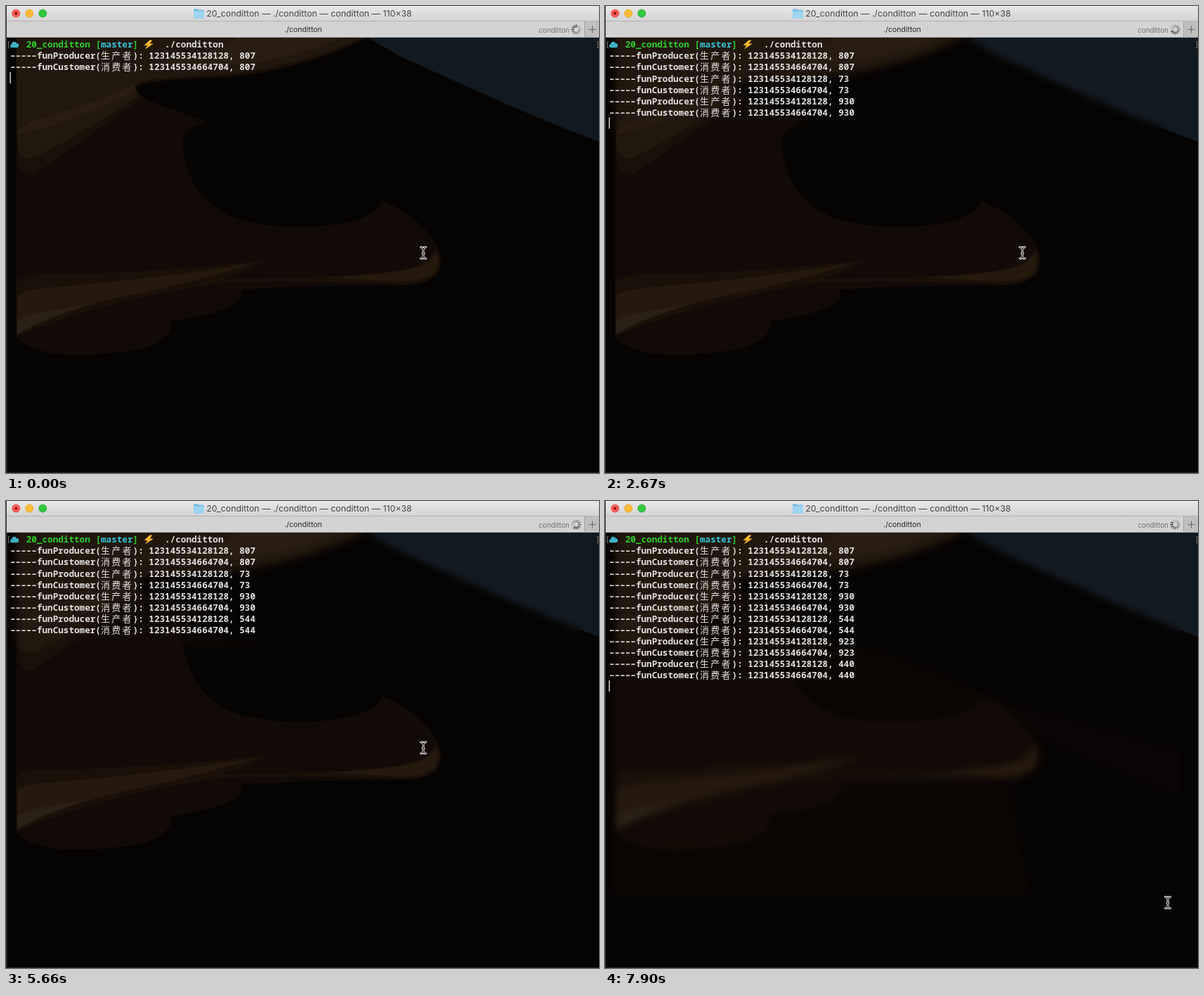
Animation, 844 px wide and 664 px high, one loop 8 s. Source, as an HTML page:

```html
<!DOCTYPE html>
<html lang="zh-CN">
<head>
<meta charset="utf-8">
<title>Terminal</title>
<style>
  html, body { margin: 0; width: 100%; height: 100%; overflow: hidden; background: #060403; }
  svg { display: block; width: 844px; height: 664px; }
  text { white-space: pre; }
  .ui { font-family: Inter, sans-serif; text-anchor: middle; }
  .term { font: 600 12.65px "Noto Sans Mono", monospace; fill: #e2e0de; }
  .bold { font-weight: 700; }
  .cjk { font: 500 13px "Noto Sans CJK SC", "Noto Sans CJK JP", sans-serif; }
</style>
</head>
<body>
<svg id="stage" viewBox="0 0 844 664" xmlns="http://www.w3.org/2000/svg">
  <defs>
    <linearGradient id="bar" x2="0" y2="1">
      <stop stop-color="#e9e8e9"/><stop offset="1" stop-color="#d4d3d4"/>
    </linearGradient>
    <filter id="blur" x="0" y="0" width="1" height="1" color-interpolation-filters="sRGB">
      <feGaussianBlur stdDeviation="4"/>
    </filter>
    <clipPath id="redrawn"><rect id="redrawnArea" x="6" y="45" width="813" height="0"/></clipPath>
    <g id="dunes">
      <rect y="44" width="844" height="620" fill="#060403"/>
      <path fill="#121a21" d="M513 44H844V193Q770 165 700 134T560 71Z"/>
      <path fill="#120a06" d="M14 44H515Q440 84 345 98C280 106 192 102 185 117C187 134 240 148 288 165
        C262 170 250 180 252 198C255 250 285 290 340 306C400 320 480 314 510 300Q532 290 535 277
        C575 292 618 330 620 362Q618 395 570 397Q450 396 335 403Q345 432 235 448
        Q238 475 190 488C130 497 45 505 14 470Z"/>
      <path fill="#1a1008" d="M14 44H515Q430 84 345 97C260 107 190 100 185 117Q188 126 196 130
        Q110 190 40 240Q20 245 16 215Z"/>
      <path fill="#21170c" d="M15 44H510Q425 80 345 93C260 104 186 98 182 116L188 129
        Q110 180 44 214Q20 222 16 198Z"/>
      <path fill="#291d12" d="M16 182Q20 166 70 154Q130 136 182 112L186 121Q120 152 60 172Z"/>
      <path fill="#291d12" d="M330 44H480Q420 72 340 82Q260 88 200 82Q290 72 330 44Z"/>
      <path fill="#1a1008" d="M15 392Q22 382 60 382Q200 380 368 362Q340 378 310 388Q460 388 560 376Q600 368 612 344
        Q622 360 614 380Q600 396 560 395Q430 390 310 393Q150 415 15 469Z"/>
      <path fill="#25190d" d="M16 412Q24 402 80 399Q210 388 352 366Q270 392 200 406Q100 424 16 466Z"/>
      <path fill="#25190d" d="M460 386Q550 382 590 370Q606 362 612 350Q618 366 608 380Q590 394 545 391Z"/>
      <path fill="#2b2016" d="M16 447Q50 432 112 427Q60 440 16 467Z"/>
    </g>
  </defs>

  <use href="#dunes"/>
  <g clip-path="url(#redrawn)">
    <g filter="url(#blur)">
      <use href="#dunes"/>
      <path fill="#0a0605" d="M560 288L820 362V416L620 334Z"/>
      <path fill="#120a06" opacity=".45" d="M252 190Q400 210 535 277Q520 318 420 316Q260 300 252 190Z"/>
      <path fill="#120a06" opacity=".45" d="M14 470Q230 500 335 403L570 400L600 557H14Z"/>
    </g>
  </g>
  <path fill="#2b2e37" d="M0 0H1.5V664H0Z"/>
  <path fill="#2a2424" d="M0 663H844V664H0Z"/>

  <rect x="1" width="843" height="22" fill="url(#bar)"/>
  <rect x="1" y="21" width="843" height="1" fill="#b3b2b3"/>
  <rect x="1" y="22" width="843" height="22" fill="#d4d3d4"/>
  <path fill="#c0bfc0" d="M824 22H844V44H824Z"/>
  <path fill="#a5a4a5" d="M823 22h1v22h-1ZM1 44H844v1H1Z"/>
  <g stroke-width=".7">
    <circle cx="14.3" cy="10.5" r="5.6" fill="#fb5c54" stroke="#dc4339"/>
    <circle cx="33.3" cy="10.5" r="5.6" fill="#fdbc35" stroke="#dd9d28"/>
    <circle cx="52.3" cy="10.5" r="5.6" fill="#32c83e" stroke="#24a52c"/>
    <circle cx="14.3" cy="10.5" r="1.9" fill="#7d0f0b"/>
  </g>
  <path fill="#79bfe4" d="M267 5.5q0-1.5 1.5-1.5h4l1.5 1.5h6.5q1.5 0 1.5 1.5v9.5q0 1-1 1h-13q-1 0-1-1Z"/>
  <path fill="#9dd5f2" d="M267 7.5h15v9q0 1-1 1h-13q-1 0-1-1Z"/>
  <text class="ui" x="431.5" y="15.4" font-size="12.35" fill="#454445">20_conditton — ./conditton — conditton — 110×38</text>
  <text class="ui" x="423" y="37.3" font-size="10.5" fill="#262526">./conditton</text>
  <text class="ui" x="780" y="37.8" font-size="9.8" fill="#737273">conditton</text>
  <path stroke="#666566" d="M829.5 33.5h10M834.5 28.5v10"/>
  <g id="spinner" stroke="#333" stroke-width="1.5" stroke-linecap="round"></g>

  <path fill="none" stroke="#77736f" d="M5 50.5H3.5V59.5H5M841 50.5H842.5V59.5H841"/>
  <path fill="#3fb0c4" d="M8.5 59.2q-2.700-.3-2.700-2.500 0-2.100 2.300-2.400 .4-3.500 3.600-3.500 2.500 0 3.400 2.300 3.100 0 3.100 3 0 2.800-2.600 3.100Z"/>
  <path fill="#fdb82e" d="M204.5 48.500L196.500 56H201.500L198 61.500L210 53.500H204.500L208.500 48.500Z"/>
  <g id="output"></g>
  <rect id="caret" x="5.5" width="1.3" height="16" fill="#f2f2f2"/>
  <g id="pointer" fill="none" stroke-linecap="round">
    <path id="beam" d="M-3.500-8Q0-8 0-5Q0-8 3.500-8M0-5V5M-3.500 8Q0 8 0 5Q0 8 3.500 8M-1 1H1"/>
  </g>
</svg>

<script>
const LOOP = 8000, CELL = 7.59, LINE = 16.1, BLINK_AFTER = 1480;
const batches = [
  { at: 0, value: 807 }, { at: 1180, value: 73 }, { at: 2220, value: 930 },
  { at: 4170, value: 544 }, { at: 6110, value: 923 }, { at: 7160, value: 440 },
];
const $ = id => document.getElementById(id);

function add(parent, tag, attributes, content = "") {
  const node = document.createElementNS("http://www.w3.org/2000/svg", tag);
  for (const name in attributes) node.setAttribute(name, attributes[name]);
  node.textContent = content;
  return parent.appendChild(node);
}

function write(parent, row, column, content, kind = "", color = "") {
  const style = color ? `fill:${color}` : "";
  add(parent, "text", { x: 6 + column * CELL, y: 59.2 + row * LINE, class: `term ${kind}`, style }, content);
}

// En dashes give the nearly unbroken rule of the terminal's wide hyphens.
function writeLine(parent, row, name, role, thread, value) {
  write(parent, row, 0, `–––––${name}(`);
  [...role].forEach((glyph, i) => write(parent, row, 17 + 2 * i, glyph, "cjk"));
  write(parent, row, 23, `): ${thread}, ${value}`);
}

const output = $("output");
const green = "#2fd024", cyan = "#35c3d8";
write(output, 0, 3, "20_conditton", "bold", green);
write(output, 0, 16, "[", "bold", green);
write(output, 0, 17, "master", "bold", cyan);
write(output, 0, 23, "]", "bold", green);
write(output, 0, 29, "./conditton");

batches.forEach((batch, i) => {
  batch.group = add(output, "g", {});
  writeLine(batch.group, 1 + 2 * i, "funProducer", "生产者", "123145534128128", batch.value);
  writeLine(batch.group, 2 + 2 * i, "funCustomer", "消费者", "123145534664704", batch.value);
});

const spokes = Array.from({ length: 12 }, (_, i) =>
  add($("spinner"), "path", { d: "M0-3.8V-6.6", transform: `translate(811.5 33.5) rotate(${i * 30})` }));

add($("pointer"), "use", { href: "#beam", stroke: "#f5f5f5", "stroke-width": 2.9 });
add($("pointer"), "use", { href: "#beam", stroke: "#0a0a0a", "stroke-width": 1 });

function render(t) {
  let shown = 0;
  batches.forEach(({ at, group }) => {
    group.style.display = t >= at ? "" : "none";
    if (t >= at) shown++;
  });

  // Fresh output keeps the caret lit for a while before it blinks off.
  const caretY = 94 + (2 * shown - 2) * LINE;
  const caret = $("caret");
  caret.setAttribute("y", caretY);
  caret.style.display = t - batches[shown - 1].at < BLINK_AFTER ? "" : "none";

  const head = Math.floor(t / 1000 * 12) % 12;
  spokes.forEach((spoke, i) => {
    const age = (head - i + 12) % 12;
    spoke.style.opacity = Math.max(0.25, 1 - age * 0.075);
  });

  const p = Math.min(1, Math.max(0, (t - 7300) / 460));
  const eased = p * p * (3 - 2 * p);
  const x = 594 + 207 * eased, y = 351 + 220 * eased;
  $("pointer").setAttribute("transform", `translate(${x} ${y})`);

  const redrawnTo = p > 0 ? Math.max(caretY + 16, y + 8) : shown > 1 ? caretY + 16 : 45;
  $("redrawnArea").setAttribute("height", redrawnTo - 45);
}

function tick() {
  render(performance.now() % LOOP);
  requestAnimationFrame(tick);
}
tick();
</script>
</body>
</html>
```
